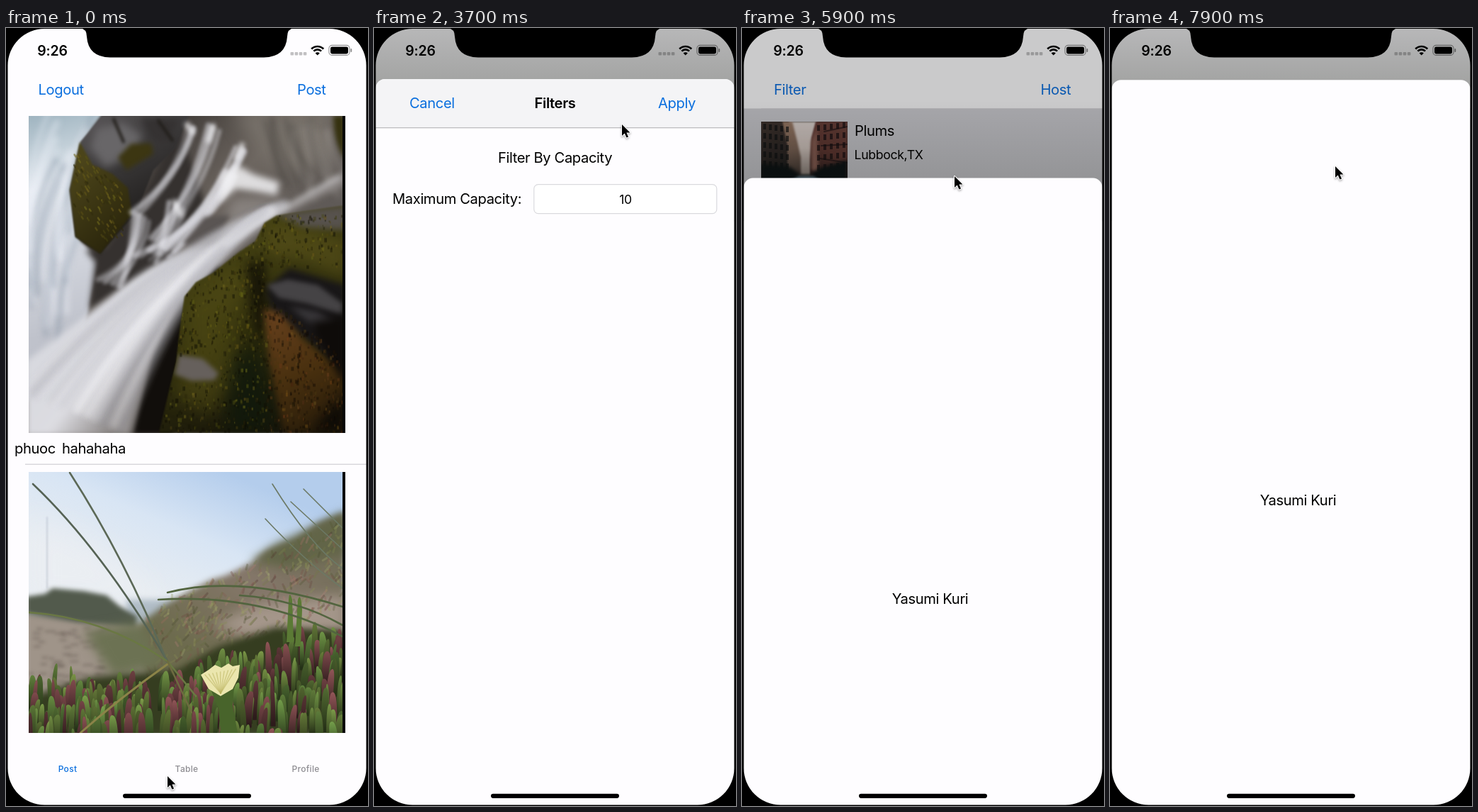
Recreate the animation shown at these times as an HTML page with a canvas. Size 511 by 1097 pixels, loop 8 s.

```html
<!DOCTYPE html>
<html lang="en">
<head>
<meta charset="utf-8">
<title>Phone app demo</title>
<style>
html, body { margin: 0; width: 100%; height: 100%; overflow: hidden; background: #000; }
canvas { display: block; width: 511px; height: 1097px; }
</style>
</head>
<body>
<canvas id="stage" width="511" height="1097"></canvas>
<script>
const ctx = document.getElementById('stage').getContext('2d');
const LOOP = 8000, STEP = 100;
const WHITE = '#fefdff', BLUE = '#0b6fde', LINE = '#d9d8dc', GRAY = '#8d8c91';
const SHEET_TOP = 72, SHEET_RANGE = 1025;

// ---------- helpers ----------
function text(str, x, y, { size = 20.2, color = '#000', weight = 400, align = 'left', gap = -0.02 * size } = {}) {
  ctx.font = `${weight} ${size}px Inter, Roboto, sans-serif`;
  ctx.letterSpacing = gap + 'px';
  ctx.textAlign = align;
  ctx.fillStyle = color;
  ctx.fillText(str, x, y);
}

function rect(x, y, w, h, color) {
  ctx.fillStyle = color;
  ctx.fillRect(x, y, w, h);
}

function round(x, y, w, h, r, fill, line) {
  ctx.beginPath();
  ctx.roundRect(x, y, w, h, r);
  if (fill) { ctx.fillStyle = fill; ctx.fill(); }
  if (line) { ctx.strokeStyle = line; ctx.lineWidth = 1.2; ctx.stroke(); }
}

function random(seed) {
  return () => (seed = (seed * 16807) % 2147483647) / 2147483647;
}

function blend(g, x0, y0, x1, y1, ...colors) {
  const grad = g.createLinearGradient(x0, y0, x1, y1);
  colors.forEach((c, i) => grad.addColorStop(i / (colors.length - 1), c));
  return grad;
}

// Paints a picture once; the painter works in stage coordinates.
function picture(x, y, w, h, paint) {
  const c = document.createElement('canvas');
  c.width = w;
  c.height = h;
  const g = c.getContext('2d');
  g.translate(-x, -y);
  const fill = (d, color, blur = 0) => {
    g.filter = blur ? `blur(${blur}px)` : 'none';
    g.fillStyle = color;
    g.fill(new Path2D(d));
    g.filter = 'none';
  };
  const stroke = (d, color, width, blur = 0) => {
    g.filter = blur ? `blur(${blur}px)` : 'none';
    g.strokeStyle = color;
    g.lineWidth = width;
    g.lineCap = 'round';
    g.stroke(new Path2D(d));
    g.filter = 'none';
  };
  paint(g, fill, stroke);
  return c;
}

// ---------- pictures ----------
const waterfall = picture(32, 123, 447, 447, (g, fill, stroke) => {
  const rnd = random(41);
  // soft bundle of water strands between two points
  const strands = (x0, y0, x1, y1, spread, n) => {
    for (let i = 0; i < n; i++) {
      const a = (rnd() - .5) * spread, b = (rnd() - .5) * spread * 1.6;
      stroke(`M${x0 + a} ${y0 + a / 2}Q${(x0 + x1) / 2 + 16 + a} ${(y0 + y1) / 2 + 12} ${x1 + b} ${y1 + b / 3}`,
        'rgba(232,232,237,.3)', 3 + rnd() * 5, 2.5);
    }
  };
  fill('M32 123H479V570H32Z', blend(g, 240, 123, 420, 290, '#403b38', '#6d6660', '#5f5a57'));
  fill('M320 115H455V180Q420 215 370 190Z', '#77716a', 12);
  fill('M462 123H479V185Q463 165 462 123Z', '#35310f', 3);
  for (let i = 0; i < 12; i++) {
    const x = 365 + rnd() * 90;
    stroke(`M${x} ${122 + rnd() * 25}q${rnd() * 20 - 5} 45 ${10 + rnd() * 30} ${70 + rnd() * 25}`,
      i % 2 ? 'rgba(165,160,154,.35)' : 'rgba(55,50,47,.3)', 6, 4);
  }
  // left fall
  fill('M28 115H140L108 160L92 230L105 300L132 325L112 420L28 530Z',
    blend(g, 32, 123, 110, 420, '#9fb4c0', '#e2e8ee', '#d2d5dd', '#bfc2cb'), 2);
  for (let i = 0; i < 24; i++) {
    const x = 24 + rnd() * 60, y = 120 + rnd() * 180;
    stroke(`M${x + 45} ${y - 30}Q${x} ${y + 60} ${x + 6} ${y + 150}`,
      i % 3 ? 'rgba(246,248,255,.4)' : 'rgba(115,132,150,.4)', 4 + rnd() * 6, 4);
  }
  // upper rock
  fill('M112 312L140 310L190 240L245 140L285 260L235 325L118 395L126 330Z', '#35312f', 4);
  fill('M136 123H258L240 168L208 200L184 260L133 318L98 294L90 228L105 160Z',
    blend(g, 130, 125, 200, 250, '#565355', '#3a3838', '#242221'), .8);
  fill('M128 140L165 133L192 150L180 178L140 196L118 168Z', '#686668', 6);
  fill('M190 126L246 128L226 164L204 156Z', '#353232', 4);
  fill('M104 160L122 192L150 205L172 225L178 262L133 318L98 294L90 228Z',
    blend(g, 95, 200, 170, 280, '#4b441a', '#2c270c'), 1.5);
  fill('M158 182L176 163L205 162L208 177L170 200Z', '#3c3612', 3);
  stroke('M152 128L166 160M215 130L235 158', '#211e1a', 4, 2);
  for (let i = 0; i < 160; i++) {
    const y = 175 + rnd() * 125, x = 94 + rnd() * 70;
    if (y - x > 165 || y < x + 65) continue;
    stroke(`M${x} ${y}l2 3`, `hsla(${48 + rnd() * 8},60%,${10 + rnd() * 20}%,.6)`, 2.5);
  }
  // thin upper streams
  strands(262, 140, 185, 262, 14, 5);
  strands(293, 140, 215, 300, 18, 9);
  strands(330, 170, 225, 310, 18, 10);
  strands(318, 205, 215, 318, 22, 12);
  strands(190, 265, 148, 360, 26, 11);
  strands(240, 250, 196, 325, 22, 6);
  stroke('M292 138L286 158M256 136L263 146M333 165L326 182M238 245L246 262', 'rgba(240,240,243,.75)', 8, 3);
  fill('M305 206L325 192L350 206L386 217L382 236L352 230L325 226L300 248Z', 'rgba(242,242,245,.85)', 5);
  fill('M320 240L352 238L395 242L330 285L300 300Z', 'rgba(148,143,140,.7)', 8);
  fill('M250 302L280 266L316 263L304 288L264 310Z', '#5a5553', 3);
  // main flow
  fill('M180 572L205 460L245 380L300 330V400L235 572Z', '#110e0b', 3);
  fill('M479 200Q390 262 300 302Q215 318 148 378L28 470V575H172Q192 470 246 388Q296 332 362 282Q420 246 479 222Z',
    blend(g, 100, 400, 215, 490, '#d8d9df', '#dcdce1', '#86817f'), 4);
  for (let i = 0; i < 34; i++) {
    const d = rnd() * 140;
    stroke(`M${395 - d / 4} ${248 + d / 9}Q${212 + d / 3.5} ${310 + d / 3.5} ${30 + d} ${510 + d / 2.4}`,
      i % 3 ? 'rgba(250,250,255,.25)' : 'rgba(128,128,138,.22)', 4 + rnd() * 8, 5);
  }
  stroke('M470 210Q380 260 310 305', 'rgba(240,240,244,.6)', 6, 4);
  // mossy rock
  const rock = 'M216 570L228 520L240 470L246 420L252 378L268 358L292 345L328 316L352 300L365 274L382 264L479 250V570Z';
  fill(rock, blend(g, 300, 290, 400, 570, '#454214', '#312f0d', '#15130a'), 1);
  g.save();
  g.clip(new Path2D(rock));
  fill('M250 385L290 350L330 330L345 350L318 420L330 490L290 545L240 520L252 440Z', 'rgba(88,82,22,.5)', 12);
  fill('M368 280L400 278L479 300V350L420 325L370 318Z', 'rgba(90,82,26,.55)', 8);
  fill('M340 330L365 328L372 400L355 450L345 390Z', '#191708', 7);
  fill('M318 470L350 440L372 500L378 570H310Z', 'rgba(16,24,12,.8)', 12);
  fill('M366 368L400 338L479 362V485L425 440L375 400Z', '#191718', 4);
  fill('M380 262L479 250V284L420 280Z', '#57524d', 4);
  fill('M368 362L398 354L440 362L475 388L474 403L425 388L385 380Z', '#454345', 3);
  fill('M400 392L440 400L470 420L440 424Z', '#39373a', 4);
  fill('M244 460L278 466L300 486L294 496L262 497L238 488Z', '#66605c', 3);
  fill('M364 395L388 402L420 440L479 485V570H392L372 470Z',
    blend(g, 375, 400, 460, 570, '#67401d', '#49300f', '#251a09'), 5);
  fill('M428 415L479 405V505Z', '#0e0b09', 6);
  fill('M430 570L479 510V570Z', '#0c0a06', 9);
  for (let i = 0; i < 1900; i++) {
    const x = 218 + rnd() * 260, y = 262 + rnd() * 307, size = 1 + rnd() * 3;
    const stone = (x > 365 && y > 335 && y < 350 + (x - 365) * .8 + 25) || (x < 302 && y > 458 && y < 498);
    if (stone) continue;
    const red = x > 368 && y > 400;
    g.fillStyle = `hsla(${red ? 22 + rnd() * 20 : 46 + rnd() * 16},${55 + rnd() * 15}%,${3 + rnd() ** 2 * 27}%,.45)`;
    g.fillRect(x, y, size, size + rnd() * 3);
  }
  g.restore();
  fill('M475 123H479V570H475Z', '#050504');
});

const dunes = picture(32, 626, 447, 368, (g, fill, stroke) => {
  const rnd = random(77);
  fill('M32 626H479V994H32Z', blend(g, 310, 626, 230, 810, '#b4cdec', '#d8e5f4', '#e8edf2'));
  fill('M32 690Q130 710 220 810H32Z', 'rgba(238,240,244,.5)', 20);
  fill('M170 806H270V850H170Z', '#b0bcc6', 4);
  fill('M28 825L150 835L240 850L230 994H28Z', '#9f9489', 3);
  fill('M28 802L55 798L66 790L110 794L142 800L160 815L185 830L182 845L100 838L28 826Z', '#525a4c', 3);
  fill('M195 835L222 815L248 800L290 778L310 772L350 752L370 736L410 722L440 698L479 682V910L200 915L180 860Z',
    blend(g, 430, 690, 280, 890, '#6c6a52', '#85776a', '#6d6b4e'), 4);
  fill('M345 752L380 728L479 682V740L400 762Z', '#626548', 7);
  fill('M290 842L360 812L479 800V850L350 862Z', '#a4968a', 9);
  for (let i = 0; i < 420; i++) {
    const x = 200 + rnd() * 275, y = 808 - (x - 230) * .44 + rnd() * 120;
    stroke(`M${x} ${y}l${rnd() * 12 - 4} ${-3 - rnd() * 6}`,
      `hsla(${rnd() < .35 ? 10 : 65},26%,${22 + rnd() * 36}%,.3)`, 3);
  }
  for (let i = 0; i < 70; i++) {
    const x = 32 + rnd() * 110, y = 845 + rnd() * 90;
    stroke(`M${x} ${y}h${4 + rnd() * 8}`, 'rgba(85,75,68,.28)', 4, 2);
  }
  fill('M110 850L190 838L225 900L150 915Z', '#6c7253', 8);
  fill('M28 945L120 915L240 906L300 872L380 845L479 850V1000H28Z', '#353d20', 5);
  // succulent leaves
  const leaves = 420;
  for (let i = 0; i < leaves; i++) {
    const x = 34 + rnd() * 440, depth = i / leaves;
    const y = 945 - Math.max(0, x - 230) * .33 * (1 - depth) + depth * 70;
    const h = 18 + rnd() * 34, w = 2.5 + rnd() * 4, lean = rnd() * 10 - 4;
    const red = rnd() < .3, hue = red ? 358 : 78 + rnd() * 14, sat = red ? 26 : 36;
    fill(`M${x - w} ${y + 14}C${x - w} ${y - h * .6} ${x + lean - w} ${y - h} ${x + lean} ${y - h}S${x + w} ${y - h * .5} ${x + w} ${y + 14}Z`,
      blend(g, 0, y - h, 0, y + 10, `hsl(${hue},${sat}%,${26 + rnd() * 20}%)`, `hsl(${hue},${sat}%,14%)`));
  }
  fill('M396 866L399 806Q400 792 404 806L406 866ZM408 872L412 806Q416 794 418 820L416 872Z', '#5b7a35', .5);
  // grass blades
  stroke('M38 643Q135 735 228 893', '#566355', 2.6, .4);
  stroke('M90 627Q168 748 228 895', '#5c6957', 2.6, .4);
  stroke('M32 824Q135 830 228 893L268 942', '#6a7843', 2.6, .4);
  stroke('M228 897Q160 945 105 994', '#8b8348', 3, .4);
  stroke('M228 893L262 965', '#6e6b40', 2.5, .5);
  stroke('M228 796Q330 770 475 816M215 806Q360 797 475 858M330 800Q410 805 475 842', '#52643f', 2.6, .5);
  stroke('M376 643Q430 730 475 762M402 668L475 735M366 692Q420 750 475 790M420 650L475 705', '#6c7965', 1.6, .5);
  stroke('M58 690V790', 'rgba(130,145,160,.4)', 1.5, 1);
  // flower
  fill('M288 930L305 940L322 930L320 955L327 994H303L300 960Z', '#48642b', .6);
  fill('M275 912L286 905L295 898L304 902L314 896L320 900L330 898L328 916L320 932L303 942L286 932Z', '#ebe6ae', .6);
  for (let i = 0; i < 9; i++) stroke(`M303 938L${281 + i * 5.4} ${912 - i}`, 'rgba(188,180,98,.55)', 1.5, .5);
  fill('M475 626H479V994H475Z', '#080907');
});

const street = picture(27, 132, 122, 123, (g, fill, stroke) => {
  const rnd = random(9);
  fill('M27 132H149V255H27Z', '#322e2d');
  fill('M66 132H106L99 160L98 206H80L76 165Z', blend(g, 88, 132, 88, 206, '#e6dcd8', '#dccfc8', '#968a83'), 1.5);
  fill('M56 132H71L78 160L83 182V210H56Z', blend(g, 60, 132, 78, 210, '#a3826c', '#82695a', '#3c3330'), 1.5);
  fill('M27 132H57L64 165V225H27Z', blend(g, 30, 132, 60, 222, '#443832', '#302927', '#101516'), 1);
  fill('M149 132H104L98 155L96 185V212L149 232Z', blend(g, 135, 132, 105, 215, '#70443d', '#643a34', '#251d1e'), 1);
  fill('M106 140L98 160V200L108 205Z', '#8d6257', 2);
  for (let row = 0; row < 5; row++) {
    for (let col = 0; col < 5; col++) {
      const y = 135 + row * 13 + col;
      fill(`M${30 + col * 8} ${y}h4v8h-4Z`, 'rgba(14,17,19,.65)', .6);
      fill(`M${146 - col * 9} ${y - 2 + row}h-4v8h4Z`, 'rgba(28,19,22,.75)', .6);
    }
  }
  stroke('M116 146L149 139M112 166L149 164M110 184L149 190', 'rgba(25,18,21,.6)', 2, .5);
  fill('M27 192L68 196L82 206L78 216L27 235ZM149 186L108 198L98 206L101 214L149 238Z', '#0e1416', 2.5);
  fill('M80 209H101L149 232V255H27V230Z', blend(g, 90, 208, 90, 255, '#566c78', '#24414e', '#112630'), 1.5);
  fill('M84 210H97L106 236H70Z', 'rgba(122,148,160,.4)', 4);
  for (let i = 0; i < 70; i++) {
    const y = 214 + rnd() * 40;
    stroke(`M${90 + (rnd() - .5) * (y - 204) * 2.2} ${y}h3`,
      i % 3 ? 'rgba(8,24,32,.4)' : 'rgba(110,140,152,.25)', 1.2);
  }
});

// ---------- motion ----------
const cursorKeys = [
  [0, 228, 1055], [350, 240, 1048], [800, 240, 1045], [1000, 236, 1028], [1800, 110, 135],
  [2150, 79, 90], [2600, 79, 90], [3500, 350, 136], [3700, 350, 136], [3850, 440, 105],
  [4050, 400, 5], [4300, 56, 105], [4500, 235, 150], [4600, 238, 150], [4800, 244, 429],
  [5350, 300, 209], [6000, 300, 209], [6300, 296, 256], [6450, 296, 256], [6700, 297, 430],
  [6800, 297, 440], [7100, 318, 195], [LOOP, 318, 195]
];

function cursorAt(t) {
  const i = cursorKeys.findIndex(k => k[0] > t);
  const [t0, x0, y0] = cursorKeys[i - 1], [t1, x1, y1] = cursorKeys[i];
  const u = (t - t0) / (t1 - t0), e = u * u * (3 - 2 * u);
  return [x0 + (x1 - x0) * e, y0 + (y1 - y0) * e];
}

// Spring up, stay, follow a drag, then fall away.
function sheetY(t, open, grab = Infinity, release = Infinity, dropY = 0) {
  const hidden = SHEET_TOP + SHEET_RANGE;
  if (t < open) return hidden;
  if (t < grab) {
    const x = (t - open) * 0.013;
    return SHEET_TOP + SHEET_RANGE * (1 + x) * Math.exp(-x);
  }
  if (t <= release) return SHEET_TOP + (dropY - SHEET_TOP) * ((t - grab) / (release - grab)) ** 2;
  return hidden + 4 - (hidden + 4 - dropY) * Math.exp((release - t) / 95);
}

// ---------- screens ----------
function tabs(active) {
  ['Post', 'Table', 'Profile'].forEach((name, i) =>
    text(name, 87 + i * 168, 1049, { size: 12, weight: 500, align: 'center', gap: 0.3, color: name === active ? BLUE : GRAY }));
}

function postScreen() {
  text('Logout', 45.5, 94, { color: BLUE });
  text('Post', 411, 94, { color: BLUE });
  ctx.drawImage(waterfall, 32, 123.5);
  text('phuoc', 12, 600);
  text('hahahaha', 79, 600);
  rect(27, 614.5, 482, 1.5, LINE);
  ctx.drawImage(dunes, 32, 626);
  tabs('Post');
}

function row(y, name, place, free, total) {
  const small = { size: 17.7 };
  ctx.drawImage(street, 27, y + 18);
  text(name, 159, y + 38);
  text(place, 158.5, y + 71, small);
  text('Available Slots:', 159, y + 133, small);
  text(free, 294.5, y + 133, small);
  text('/', 323, y + 133, small);
  text(total, 346, y + 133, small);
}

function tableScreen(loaded, selected) {
  text('Filter', 45, 94, { color: BLUE });
  text('Host', 421.5, 94, { color: BLUE });
  [113.5, 271, 429.5].forEach(y => rect(27, y, 482, 1.5, LINE));
  if (selected) rect(2, 113.5, 507, 158.5, '#d1d1d6');
  if (loaded) {
    row(114, 'Plums', 'Lubbock,TX', '2', '4');
    row(272, 'munchabunch', 'SFO,TX', '3', '5');
  }
  tabs('Table');
}

function sheet(top, content) {
  if (top >= 1096) return;
  const p = 1 - (top - SHEET_TOP) / SHEET_RANGE;
  rect(0, 0, 511, 1097, `rgba(0,0,0,${0.235 * p})`);
  rect(0, top - 110, 511, 125, blend(ctx, 0, top - 110, 0, top, 'rgba(0,0,0,0)', `rgba(8,12,0,${0.16 * p * p})`));
  ctx.save();
  ctx.translate(0, top);
  round(2.5, 0, 506, 1100, [13, 13, 0, 0], WHITE);
  content();
  ctx.restore();
}

function filters() {
  round(2.5, 0, 506, 69, [13, 13, 0, 0], '#f4f4f6');
  rect(2, 68, 507, 1.3, '#bdbdc0');
  text('Cancel', 50, 41, { color: BLUE });
  text('Filters', 255.5, 41, { weight: 600, align: 'center' });
  text('Apply', 401, 41, { color: BLUE });
  text('Filter By Capacity', 255.5, 118, { align: 'center' });
  text('Maximum Capacity:', 26, 176);
  round(225.8, 148.6, 258, 41, 6, '#fff', '#dadade');
  text('10', 355, 176, { size: 17.7, align: 'center' });
}

function profile() {
  text('Yasumi Kuri', 265.5, 600, { align: 'center' });
}

function statusBar() {
  text('9:26', 65.5, 38.5, { size: 19.5, weight: 600, align: 'center', gap: -0.2 });
  for (let i = 0; i < 4; i++) round(401.5 + i * 6.1, 34, 4.6, 4.6, 1, 'rgba(0,0,0,.24)');
  ctx.strokeStyle = ctx.fillStyle = '#000';
  ctx.lineWidth = 2.7;
  ctx.lineCap = 'butt';
  const fan = [-Math.PI * .75, -Math.PI * .25];
  for (const r of [7.6, 12]) {
    ctx.beginPath();
    ctx.arc(439.7, 38, r, ...fan);
    ctx.stroke();
  }
  ctx.beginPath();
  ctx.moveTo(439.7, 38.6);
  ctx.arc(439.7, 38.6, 4.4, ...fan);
  ctx.fill();
  round(456, 24.4, 29, 14, 4.2, null, 'rgba(0,0,0,.42)');
  round(458, 26.4, 25, 10, 2.4, '#000');
  round(486.4, 29, 1.8, 5, 1, 'rgba(0,0,0,.45)');
}

function body() {
  ctx.fillStyle = '#000';
  ctx.beginPath();
  ctx.rect(0, 0, 511, 1097);
  ctx.roundRect(2.5, 1, 506, 1094.5, 52);
  ctx.fill('evenodd');
  ctx.fill(new Path2D('M104 0Q114 1 114 12Q116 41 147 41.5H364Q395 41 397 12Q397 1 407 0Z'));
  round(165, 1079.7, 181, 6.2, 3.1, '#000');
}

const arrow = new Path2D('M0 0V18.4L4.3 14.4L7.4 21.4L10.4 20.1L7.4 13.3H13.2Z');
function cursor(x, y) {
  ctx.save();
  ctx.translate(x, y);
  ctx.scale(.87, .87);
  ctx.lineJoin = 'round';
  ctx.shadowColor = 'rgba(0,0,0,.35)';
  ctx.shadowBlur = 3;
  ctx.shadowOffsetY = 1.5;
  ctx.strokeStyle = '#fff';
  ctx.lineWidth = 2.4;
  ctx.stroke(arrow);
  ctx.shadowColor = 'transparent';
  ctx.fillStyle = '#000';
  ctx.fill(arrow);
  ctx.restore();
}

function draw(t) {
  rect(0, 0, 511, 1097, WHITE);
  if (t < 700) postScreen();
  else tableScreen(t >= 1200, t >= 5600);
  if (t < 5500) sheet(sheetY(t, 2370, 4600, 4800, 458), filters);
  else if (t < 7200) sheet(sheetY(t, 5631, 6450, 6700, 246), profile);
  else sheet(sheetY(t, 7200), profile);
  statusBar();
  body();
  cursor(...cursorAt(t));
}

const start = performance.now();
let shown = -1;
function tick() {
  const t = Math.floor(((performance.now() - start) % LOOP) / STEP) * STEP;
  if (t !== shown) draw(shown = t);
  requestAnimationFrame(tick);
}
tick();
</script>
</body>
</html>
```
